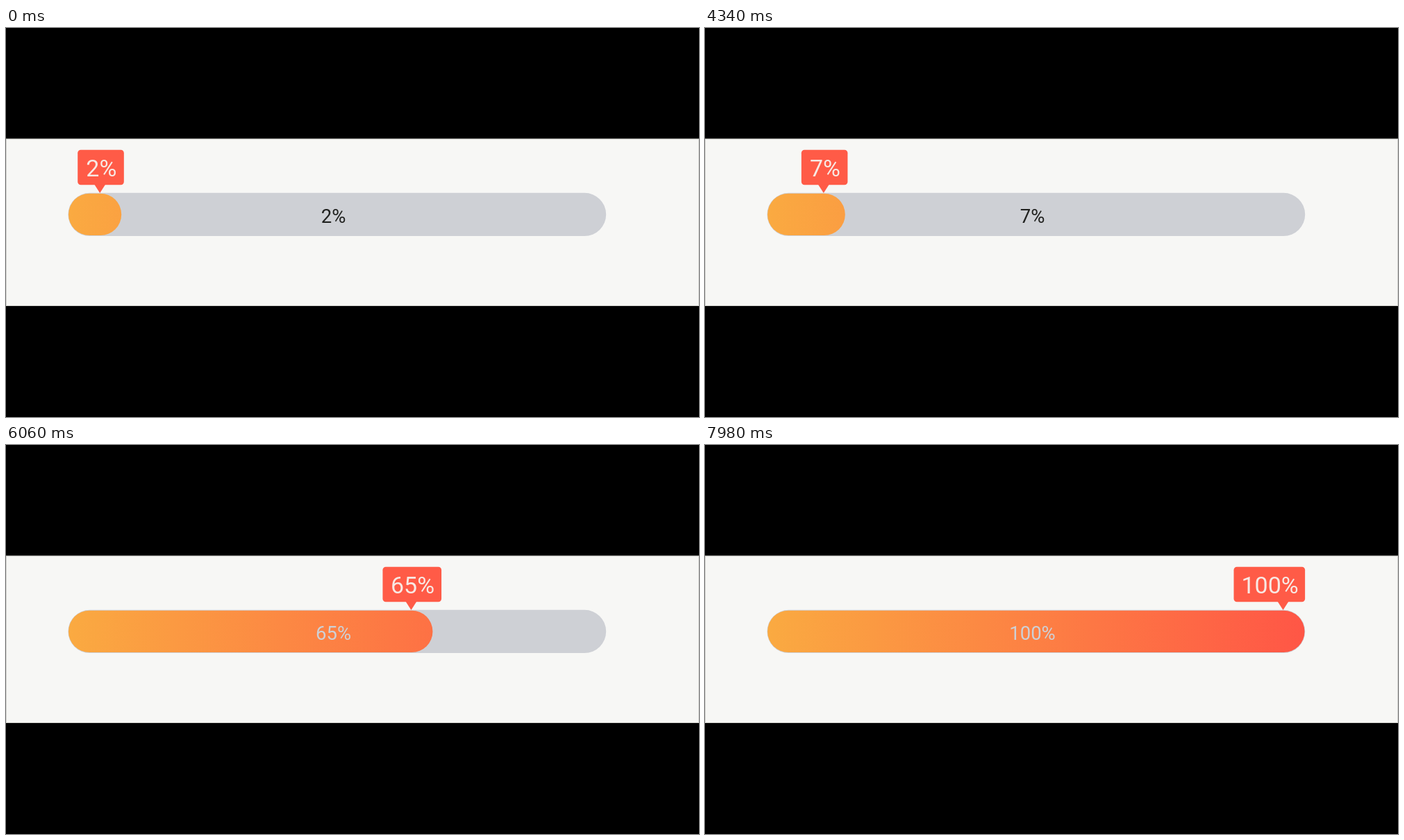
Recreate the animation shown at these times as an HTML page. Size 998x561 px, loop 8 s.

```html
<!DOCTYPE html>
<html lang="en">
<head>
<meta charset="utf-8">
<title>Progress bar</title>
<style>
  html, body { margin: 0; width: 100%; height: 100%; overflow: hidden; background: #000; }
  svg { display: block; width: 998px; height: 561px; }
  text { font-family: Roboto, Arial, sans-serif; text-anchor: middle; }
  .value { font-size: 27.5px; }
  .tip { font-size: 34px; fill: #f8e9e4; }
</style>
</head>
<body>
<svg viewBox="0 0 998 561">
  <defs>
    <linearGradient id="heat" gradientUnits="userSpaceOnUse" x1="90" y1="0" x2="863.5" y2="0">
      <stop offset="0" stop-color="#faaa41"/>
      <stop offset="1" stop-color="#ff5646"/>
    </linearGradient>
    <clipPath id="filled">
      <rect class="fill" x="90" y="238.8" height="60.2" rx="30.1"/>
    </clipPath>
  </defs>

  <rect x=".5" y="160" width="997" height="240.5" fill="#f7f7f5" stroke="#d2d2ce"/>
  <rect x="89.4" y="237.8" width="774.8" height="62.2" rx="31.1" fill="#ced0d5"/>
  <text class="value" x="471.5" y="280.8" fill="#20211f"></text>
  <rect class="fill" x="90" y="238.8" height="60.2" rx="30.1" fill="url(#heat)"/>
  <g clip-path="url(#filled)">
    <text class="value" x="471.5" y="280.8" fill="#ced0d5"></text>
  </g>

  <g fill="#ff5b47">
    <rect id="bubble" y="175.7" height="50.6" rx="4.5"/>
    <path id="pointer" d="M-8 225.5H8L0 238Z"/>
  </g>
  <text class="tip" id="tip" y="213.8"></text>
</svg>

<script>
  const LOOP = 8000;
  const LEFT = 90, RIGHT = 863.5, CAP = 62;

  // [time in ms, percent]
  const path = [
    [3860, 2], [4760, 12.1], [5320, 24.2], [6060, 65],
    [6440, 93], [6900, 99], [7300, 100]
  ];
  // Short stalls during the drag
  const stalls = [[4660, 4760], [5500, 5600], [6060, 6160], [6340, 6440], [7180, 7280]];

  const secant = i => (path[i + 1][1] - path[i][1]) / (path[i + 1][0] - path[i][0]);

  // Harmonic mean of neighbouring slopes keeps the curve monotone
  const slopes = path.map((_, i) => {
    if (i === 0) return secant(0);
    if (i === path.length - 1) return 0;
    const a = secant(i - 1), b = secant(i);
    return 2 * a * b / (a + b);
  });

  function percentAt(time) {
    const stall = stalls.find(([from, to]) => time >= from && time < to);
    const t = stall ? stall[0] : time;
    if (t <= path[0][0]) return path[0][1];
    const next = path.findIndex(p => p[0] > t);
    if (next < 0) return 100;
    const i = next - 1;
    const [t0, p0] = path[i], [t1, p1] = path[next];
    const span = t1 - t0, u = (t - t0) / span, v = 1 - u;
    const value = v * v * (1 + 2 * u) * p0 + u * u * (3 - 2 * u) * p1
      + span * u * v * (v * slopes[i] - u * slopes[next]);
    return Math.round(value);
  }

  const fills = document.querySelectorAll(".fill");
  const values = document.querySelectorAll(".value");
  const bubble = document.getElementById("bubble");
  const pointer = document.getElementById("pointer");
  const tip = document.getElementById("tip");

  function draw(percent) {
    const label = percent + "%";
    const end = LEFT + CAP + (RIGHT - LEFT - CAP) * percent / 100;
    const tipX = end - 31;
    const width = 30.6 + 18 * label.length;
    const x = Math.min(tipX - width / 2 + 1.3, RIGHT + 0.6 - width);

    fills.forEach(f => f.setAttribute("width", end - LEFT));
    values.forEach(v => v.textContent = label);
    bubble.setAttribute("x", x);
    bubble.setAttribute("width", width);
    pointer.setAttribute("transform", `translate(${tipX} 0)`);
    tip.setAttribute("x", x + width / 2 + 0.8);
    tip.textContent = label;
  }

  const start = performance.now();
  function tick() {
    draw(percentAt((performance.now() - start) % LOOP));
    requestAnimationFrame(tick);
  }
  tick();
</script>
</body>
</html>
```
